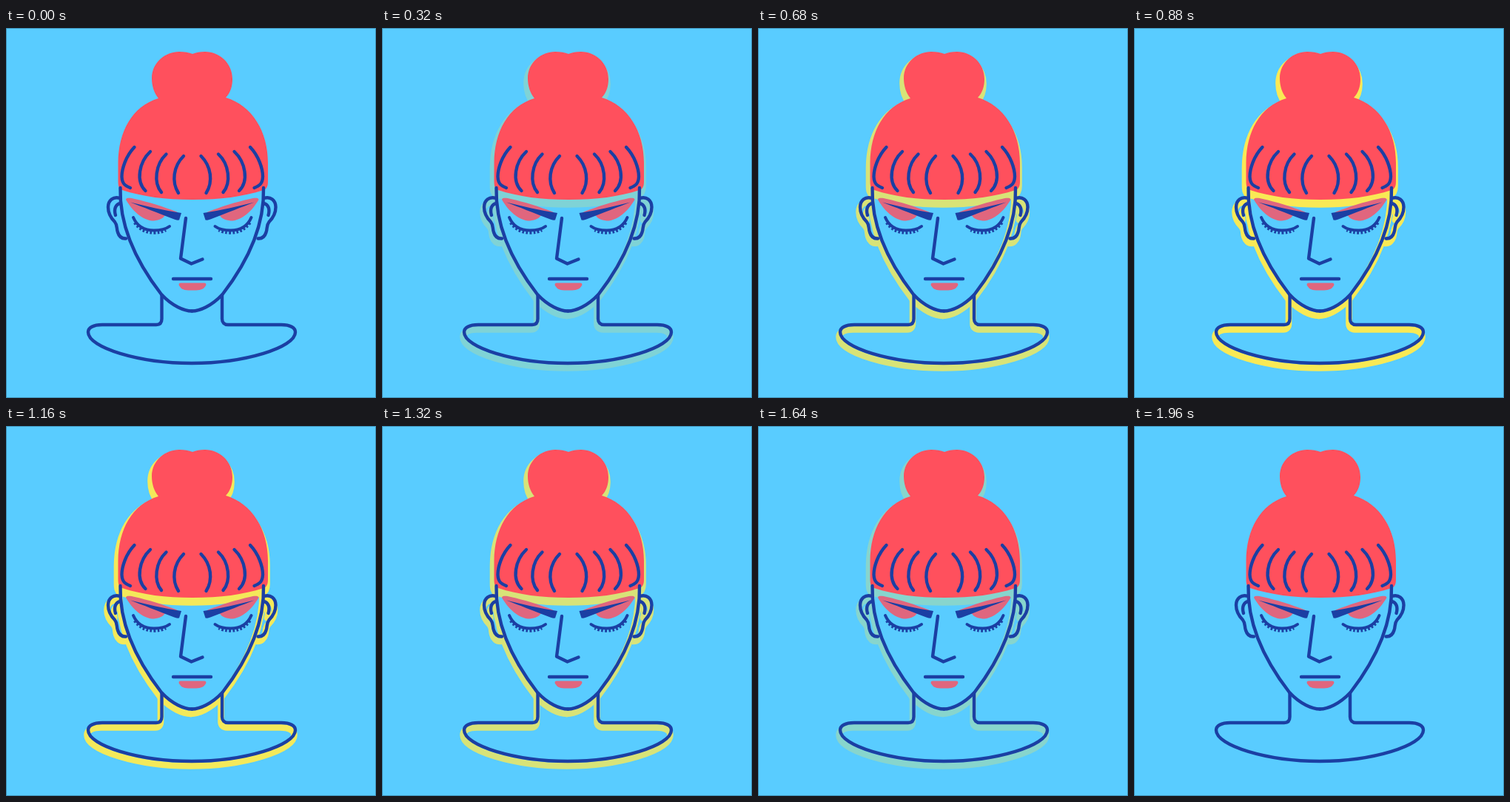
An HTML page that plays this animation: 500x500 px, repeating every 2000 ms.

```html
<!DOCTYPE html>
<html lang="en">
<head>
<meta charset="utf-8">
<title>Portrait with pulsing glow</title>
<style>
  html, body { margin: 0; width: 100%; height: 100%; overflow: hidden; background: #59ccff; }
  svg { display: block; width: 100vw; height: 100vh; }
  .line { fill: none; stroke: #1b3fa3; stroke-width: 4.4; stroke-linecap: round; stroke-linejoin: round; }
  .ink { fill: #1b3fa3; }
  .hair { fill: #ff505d; }
  .makeup { fill: #e0667e; }
  .lashes { fill: none; stroke: #1b3fa3; stroke-width: 4.4; stroke-dasharray: 2.6 2.4; }
  .glow { fill: none; stroke: #ffeb4f; stroke-width: 8.6; stroke-linecap: round; stroke-linejoin: round;
          animation: pulse 2s infinite; }
  .glow .solid { fill: #ffeb4f; }
  .edge { fill: none; stroke: #3f8fb8; stroke-width: 1; }
  /* sine-shaped fade in and out */
  @keyframes pulse {
    0%, 100% { opacity: 0; animation-timing-function: cubic-bezier(.364, 0, .636, 1); }
    50% { opacity: 1; animation-timing-function: cubic-bezier(.364, 0, .636, 1); }
  }
</style>
</head>
<body>
<svg viewBox="0 0 500 500">
  <defs>
    <path id="hair" d="M206 95 C200 88 197 78 197 68 C197 46 216 32 234 32 C241 32 247 33 252 35
      C257 33 262 32 269 32 C288 32 306 47 306 69 C306 79 303 88 297 94
      C333 105 354 140 354 182 V207 C354 213 353 217 348 219 C320 228 290 232 252 232
      C215 232 185 228 157 219 C152 217 151.5 213 151.5 206 V182 C152 140 170 106 206 95 Z"/>
    <path id="bust" d="M210.5 361 V393 C210.500 398 208 401 203 401 H130 C118 401 111 405 111 411
      C111 432 180 453 251 453 C322 453 391 432 391 411 C391 405 384 401 372 401
      H300 C295 401 292 398 292 393 V361"/>
    <g id="half">
      <path d="M154.5 216 C153.5 250 163.5 300 210 360 C225 376 241 382.5 251.25 382.5"/>
      <path d="M154 230 C145 227 138 233 138 242 C138 251 142 257 147 262 C151 267 149 271 151 276
        C152.5 281 156 285 162 284.500"/>
      <path d="M154.5 237 C148 238 145.5 245 148 253"/>
    </g>
    <g id="outline">
      <use href="#half"/>
      <use href="#half" transform="matrix(-1 0 0 1 502.5 0)"/>
      <use href="#bust"/>
    </g>
    <g id="features">
      <path class="makeup" d="M162 232 C162 229 168 229.5 174 231 C192 235 212 241 232 249 L214 254
        C212 258 205 260.5 197 260.5 C181 258 169 244 162 232 Z"/>
      <path class="ink" d="M168 235.500 C190 241 213 246.500 237 250 L234 259.500 C231 260 228 259 226 258
        C205 250 185 242 168 235.500 Z"/>
      <path class="line" style="stroke-width:4" d="M172 256 C178 270 190 273.500 200 273.500 C210 273.500 217 271 221 268"/>
      <path class="lashes" d="M174 263 C181 273 190 276.500 200 276.500 C207 276.500 212 275 216 273"/>
      <path class="line" d="M173.5 161 C162 173 156.500 190 156.500 201 C157 211 161 213 168 216
        M195 167 C180 181 175 207 188.500 220
        M216.500 170.500 C202 184 199 209 210 222
        M240 173 C226 187 223.500 208 233 223"/>
    </g>
  </defs>

  <rect width="500" height="500" fill="#59ccff"/>
  <g class="glow">
    <g transform="translate(-1.5 6.4)">
      <use class="solid" href="#hair"/>
      <use href="#outline"/>
    </g>
  </g>
  <use class="hair" href="#hair"/>
  <use class="line" href="#outline"/>
  <use href="#features"/>
  <use href="#features" transform="matrix(-1 0 0 1 503.5 0)"/>
  <path class="line" d="M243 257 L236 311.5 L250.5 318.5 L265.5 312.500"/>
  <path class="line" d="M226 339 H277"/>
  <path class="makeup" d="M236 344.500 H268 C271 344.500 271 347.500 269 349.500 C266 354.500 258 354.500 252 354.500
    C244 354.500 238 354.500 235 349.500 C233 347.500 233 344.500 236 344.500 Z"/>
  <rect class="edge" x=".5" y=".5" width="499" height="499"/>
</svg>
</body>
</html>
```
